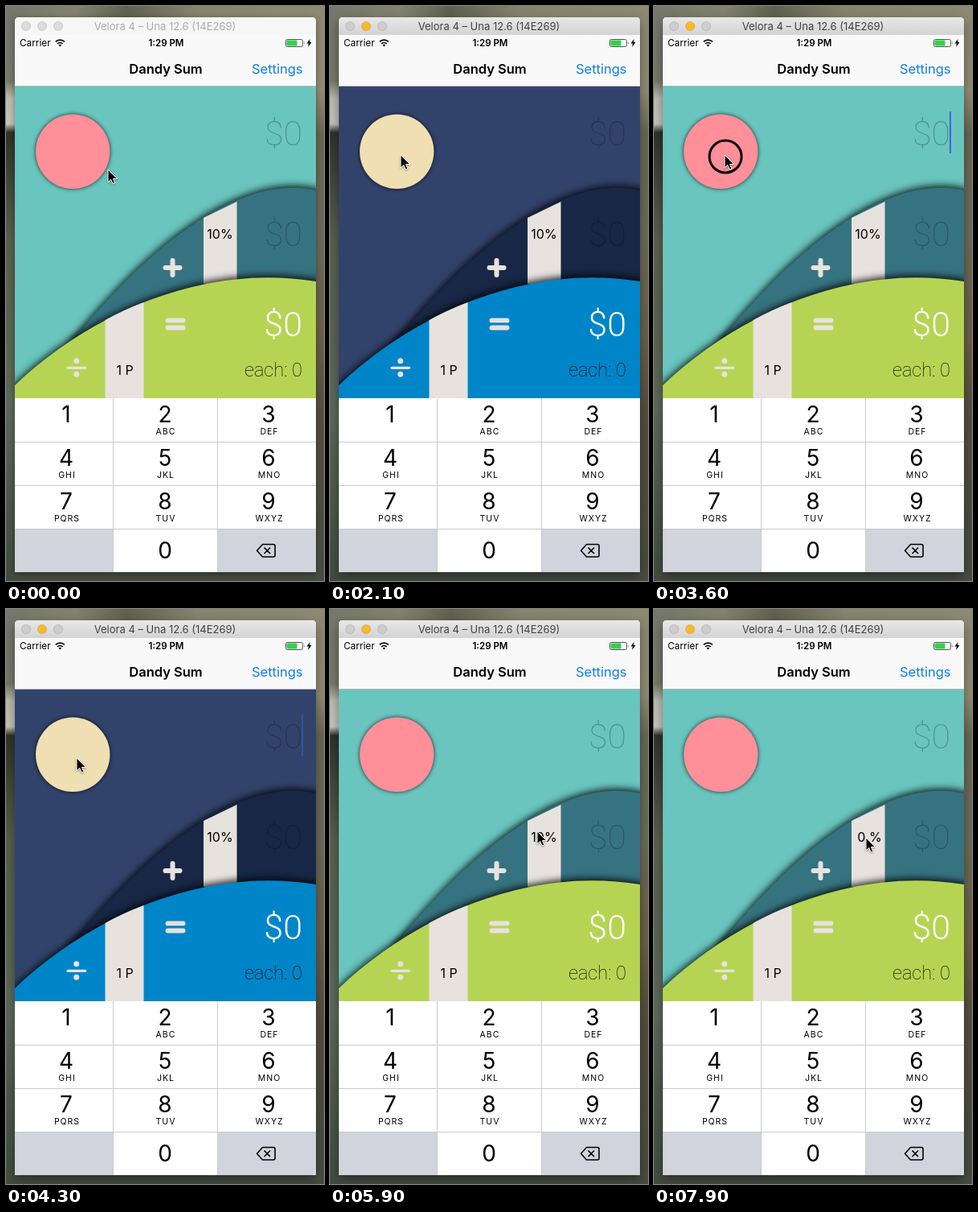
These frames come from a looping animation (396 by 714 pixels, 8 s). An HTML page:

```html
<!DOCTYPE html>
<html lang="en">
<head>
<meta charset="utf-8">
<title>Tip calculator</title>
<style>
  html, body { margin: 0; width: 100%; height: 100%; overflow: hidden; background: #4b4f42; }
  svg { display: block; width: 396px; height: 714px; font-family: Inter, "Liberation Sans", sans-serif; }
  .mid { text-anchor: middle; }
  .end { text-anchor: end; }
  .thin { font: 100 43px Roboto, "Open Sans", sans-serif; }
  .sky { fill: var(--sky); }
  .back { fill: var(--back); }
  .front { fill: var(--front); }
  .sun { fill: var(--sun); filter: drop-shadow(0 0 2.5px rgba(0, 0, 0, .8)); }
  .cast { filter: drop-shadow(0 -3px 4px rgba(0, 0, 0, .8)); }
  .strip { fill: #e7e2de; }
  .sign { stroke: #e7e2de; stroke-linecap: round; fill: none; }
</style>
</head>
<body>
<svg viewBox="0 0 396 714">
  <defs>
    <linearGradient id="left" x2="0" y2="1">
      <stop offset="0" stop-color="#74776a"/><stop offset=".13" stop-color="#777a68"/>
      <stop offset=".16" stop-color="#bdbdb2"/><stop offset=".205" stop-color="#c6c5bb"/>
      <stop offset=".22" stop-color="#2f332b"/><stop offset=".4" stop-color="#59604f"/>
      <stop offset=".7" stop-color="#5d6a5a"/><stop offset="1" stop-color="#414c40"/>
    </linearGradient>
    <linearGradient id="right" x2="0" y2="1">
      <stop offset="0" stop-color="#8d8a72"/><stop offset=".15" stop-color="#938d75"/>
      <stop offset=".22" stop-color="#6a6855"/><stop offset=".4" stop-color="#6d6b59"/>
      <stop offset=".58" stop-color="#6b5f48"/><stop offset=".7" stop-color="#55503f"/>
      <stop offset="1" stop-color="#484d41"/>
    </linearGradient>
    <linearGradient id="top">
      <stop offset="0" stop-color="#74776a"/><stop offset=".22" stop-color="#82836d"/>
      <stop offset=".38" stop-color="#5f6050"/><stop offset=".6" stop-color="#86846d"/>
      <stop offset="1" stop-color="#8d8a72"/>
    </linearGradient>
    <linearGradient id="bar" x2="0" y2="1">
      <stop offset="0" stop-color="#e8e8e8"/><stop offset="1" stop-color="#d3d3d3"/>
    </linearGradient>
    <clipPath id="scene"><rect x="11" y="100" width="375" height="387"/></clipPath>
    <clipPath id="slot"><path d="M246 263L287.5 243V345H246Z"/></clipPath>
  </defs>

  <!-- desktop -->
  <rect width="200" height="714" fill="url(#left)"/>
  <rect x="198" width="198" height="714" fill="url(#right)"/>
  <rect width="396" height="16" fill="url(#top)"/>
  <rect x="11" y="703" width="375" height="11" fill="#454c40"/>

  <!-- window -->
  <path id="frame" d="M11 703V19q0-5 5-5H381q5 0 5 5V703Z" fill="#f9f9f9"/>
  <path id="titlebar" d="M11 36V19q0-5 5-5H381q5 0 5 5V36Z"/>
  <g id="lights" stroke-opacity=".12" stroke="#000">
    <circle cx="25" cy="25" r="5.6"/><circle cx="45" cy="25" r="5.6"/><circle cx="65" cy="25" r="5.6"/>
  </g>
  <text id="title" class="mid" x="198" y="30" font-size="13">Velora 4 – Una 12.6 (14E269)</text>

  <!-- status and navigation -->
  <text x="17" y="50" font-size="11.8">Carrier</text>
  <g fill="none" stroke="#000" stroke-width="1.7">
    <path d="M61.8 44.4a7.6 7.6 0 0 1 11 0M64 46.9a4.6 4.6 0 0 1 6.6 0"/>
    <path d="M67.3 50.5l-1.8-1.9a2.6 2.6 0 0 1 3.6 0Z" fill="#000" stroke="none"/>
  </g>
  <text class="mid" x="199.5" y="50" font-size="11.5" font-weight="600">1:29 PM</text>
  <rect x="348.5" y="41.5" width="21" height="9" rx="2" fill="none" stroke="#555"/>
  <rect x="349.5" y="42.5" width="13" height="7" rx="1" fill="#35d04f"/>
  <path d="M371 44.5q1.5 1.5 0 3Z" fill="#555"/>
  <path d="M378.5 41l-4 5.5h2.5l-1 4.5 4.5-6H378Z"/>
  <text class="mid" x="199" y="84" font-size="16.5" font-weight="600">Dandy Sum</text>
  <text class="end" x="369.5" y="84" font-size="16.5" fill="#0f7fe3">Settings</text>
  <path d="M11 99.5H386" stroke="#b4b8b8"/>

  <!-- landscape -->
  <g clip-path="url(#scene)">
    <rect class="sky" x="11" y="100" width="375" height="387"/>
    <circle class="sun" cx="83.2" cy="180.8" r="46.2"/>
    <text class="thin end dim" x="369" y="173">$0</text>
    <rect id="caret" x="368" y="131" width="2" height="52" fill="#4561e0"/>
    <path class="back cast" d="M80 419C175 301 290 207 386 229L420 241V500H80Z"/>
    <path class="strip" d="M246 263L287.5 243V345H246Z"/>
    <g clip-path="url(#slot)" font-size="16" class="mid">
      <text class="row"/><text class="row"/>
    </g>
    <path class="sign" d="M198.5 325H216.5M207.5 316V334" stroke-width="6"/>
    <text class="thin end dim" x="369" y="298">$0</text>
    <path class="front cast" d="M-10 489L11 471C105 382 245 319 386 342L420 350V520H-10Z"/>
    <path class="strip" d="M123.5 390Q147 377 171.5 368V487H123.5Z"/>
    <text class="mid" x="148" y="457.5" font-size="16">1 P</text>
    <path class="sign" d="M201.5 390.4H220.5M201.5 399.5H220.5" stroke-width="5.9"/>
    <path class="sign" d="M77 449.3H98.5" stroke-width="3.3"/>
    <path class="sign" d="M87.7 440.8v0M87.7 457.2v0" stroke-width="7"/>
    <text class="thin end" x="369" y="410" fill="#fff" style="font-weight:300">$0</text>
    <text class="thin end" x="369" y="460" style="font-size:23.6px">each: 0</text>
  </g>

  <g id="keys"></g>

  <!-- pointer -->
  <g id="pointer">
    <circle id="ring" cx="1" cy="2" r="20" fill="none" stroke="#000" stroke-width="3"/>
    <path d="M0 0V16l3.7-3.5 2.5 5.6 2.6-1.1-2.4-5.5H11.5Z" stroke="#fff" stroke-width="1"
      style="filter:drop-shadow(0 1px 1px rgba(0,0,0,.4))"/>
  </g>
</svg>
<script>
const LOOP = 8000;
const $ = id => document.getElementById(id);
const all = q => [...document.querySelectorAll(q)];
const clamp = x => Math.max(0, Math.min(1, x));
const ease = x => (x = clamp(x), x * x * (3 - 2 * x));
const span = (t, a, b) => ease((t - a) / (b - a));

// Day and night colours
const palette = {
  sky: [[105, 197, 190], [50, 67, 107]],
  back: [[54, 115, 128], [23, 39, 69]],
  front: [[182, 212, 83], [0, 133, 200]],
  sun: [[255, 143, 153], [240, 223, 178]]
};
// Each press on the sun: [down, up]
const taps = [[700, 950], [2400, 2700], [3500, 3750], [4600, 4850]];
const drag = [6200, 7300];
// Pointer stops: [time, x, y]
const stops = [[200, 127, 203], [600, 88, 185], [5100, 88, 185],
  [5800, 258, 276], [6300, 258, 276], [7300, 264, 284]];

function buildKeys() {
  const letters = ["", "ABC", "DEF", "GHI", "JKL", "MNO", "PQRS", "TUV", "WXYZ"];
  const columns = [75, 198, 327];
  let out = '<rect x="11" y="487" width="375" height="216" fill="#fff"/>' +
    '<path d="M11 650H133V703H11ZM264 650H386V703H264Z" fill="#d1d4dc"/>' +
    '<path d="M133.5 487V703M263.5 487V703M11 541.5H386M11 595.5H386M11 649.5H386" stroke="#c9cbcf"/>';
  const digit = (n, x, y) => `<text class="mid" x="${x}" y="${y}" font-size="28">${n}</text>`;
  letters.forEach((word, i) => {
    const x = columns[i % 3], y = 517 + 54 * Math.floor(i / 3);
    out += digit(i + 1, x, y) +
      `<text class="mid" x="${x + 1}" y="${y + 15}" font-size="10.5" letter-spacing="1">${word}</text>`;
  });
  out += digit(0, 198, 686) +
    '<path d="M319.5 668.5H333q2 0 2 2V682q0 2-2 2H319.5L312.5 676.2ZM321.5 672.5l7.5 7.5M329 672.5l-7.5 7.5" ' +
    'fill="none" stroke="#000" stroke-width="1.6" stroke-linejoin="round"/>';
  $("keys").innerHTML = out;
}

function pointerAt(t) {
  let [, x, y] = stops[0];
  for (let i = 1; i < stops.length; i++) {
    const k = span(t, stops[i - 1][0], stops[i][0]);
    x += (stops[i][1] - stops[i - 1][1]) * k;
    y += (stops[i][2] - stops[i - 1][2]) * k;
  }
  return [x, y];
}

function drawWindow(active) {
  $("titlebar").setAttribute("fill", active ? "url(#bar)" : "#f6f6f6");
  $("title").setAttribute("fill", active ? "#404040" : "#ababab");
  $("frame").style.filter = `drop-shadow(0 ${active ? 5 : 2}px ${active ? 7 : 4}px rgba(0,0,0,.4))`;
  const idle = active ? "#cdcdcd" : "#dcdcdc";
  [...$("lights").children].forEach((dot, i) =>
    dot.setAttribute("fill", active && i === 1 ? "#fcb827" : idle));
}

function drawScene(t) {
  const night = taps.reduce((n, tap, i) => n + (i % 2 ? -1 : 1) * span(t, tap[1], tap[1] + 300), 0);
  const root = document.documentElement.style;
  for (const name in palette) {
    const [day, dark] = palette[name];
    root.setProperty("--" + name, `rgb(${day.map((c, i) => c + (dark[i] - c) * night)})`);
  }
  all(".dim").forEach(el => el.setAttribute("fill", "rgba(0,15,25,.3)"));

  const beat = t % 1000;
  $("caret").setAttribute("opacity", span(beat, 220, 400) * (1 - span(beat, 800, 900)));
}

function drawPicker(t) {
  const value = 10 * (1 - span(t, 6300, 7500));
  const low = Math.floor(value);
  all(".row").forEach((row, i) => {
    const n = low + i;
    row.textContent = String(n).padEnd(2, "\u00a0") + "%";
    row.setAttribute("x", n < 10 ? 268.5 : 266.5);
    row.setAttribute("y", 289 + (n - value) * 70);
  });
}

function draw(t) {
  drawWindow(t >= 600);
  drawScene(t);
  drawPicker(t);
  $("pointer").setAttribute("transform", `translate(${pointerAt(t)})`);
  const down = [...taps, drag].some(([a, b]) => t >= a && t < b);
  $("ring").setAttribute("visibility", down ? "visible" : "hidden");
}

buildKeys();
const start = performance.now();
function tick() {
  draw((performance.now() - start) % LOOP);
  requestAnimationFrame(tick);
}
tick();
</script>
</body>
</html>
```
